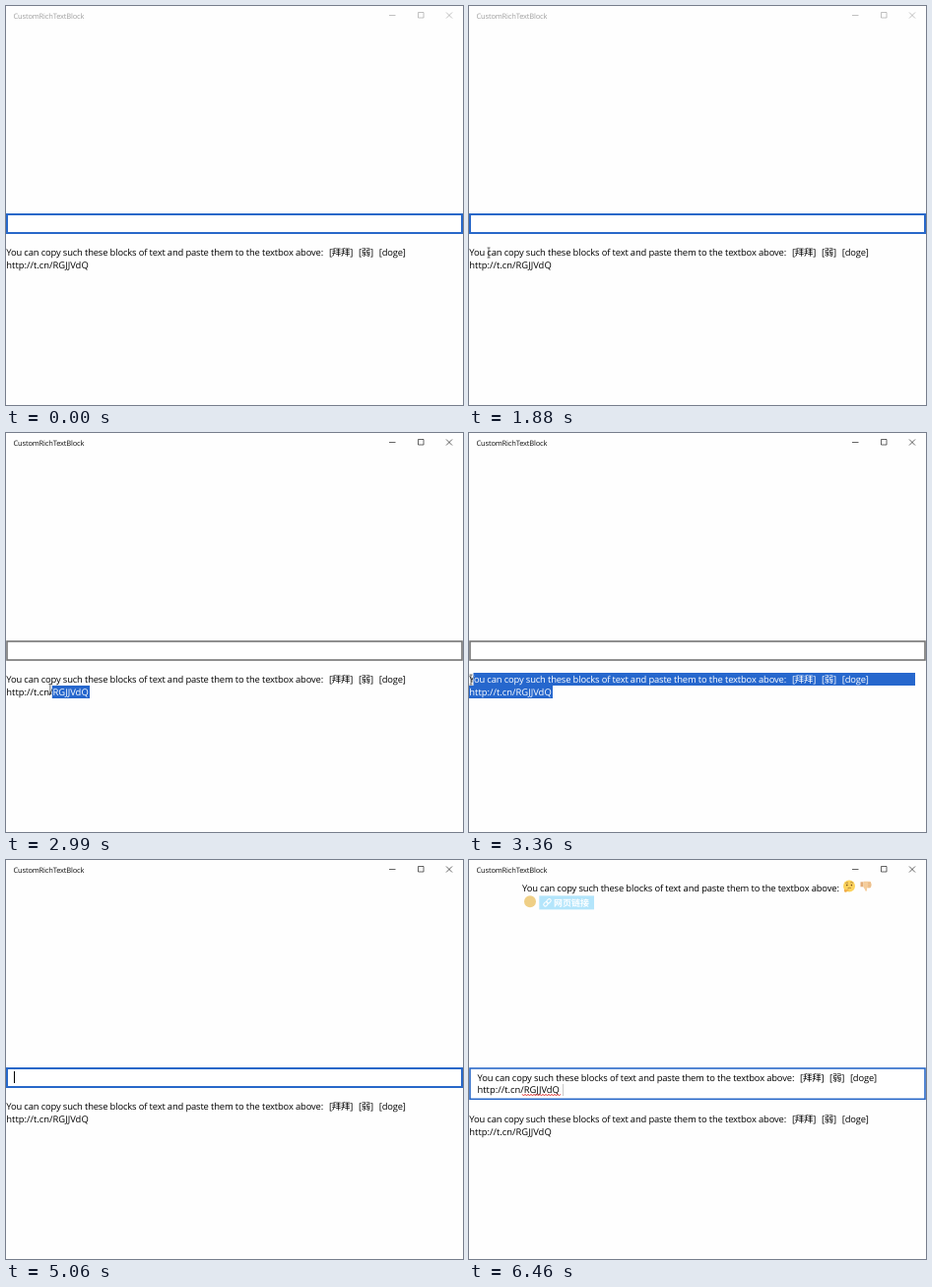
An HTML page for the animation above (6.48 s loop, 464 by 406 pixels).

```html
<!DOCTYPE html>
<html lang="en">
<head>
<meta charset="utf-8">
<title>CustomRichTextBlock</title>
<style>
  html, body { margin: 0; width: 100%; height: 100%; overflow: hidden; background: #fefefe; }
  svg { display: block; width: 100vw; height: 100vh; }
  text {
    font: 9.4px 'Open Sans', 'Noto Sans CJK SC', 'Noto Sans CJK', sans-serif;
    letter-spacing: -.142px;
    text-rendering: geometricPrecision;
  }
  .url { letter-spacing: .02px; }
  .title { font-size: 7.5px; letter-spacing: -.16px; }
  .link { font-size: 9px; font-weight: 700; letter-spacing: 0; fill: #fff; }
  .line { fill: none; }
</style>
</head>
<body>
<svg viewBox="0 0 464 406">
  <defs>
    <text id="lead">You can copy such these blocks of text and paste them to the textbox above:</text>
    <g id="message">
      <use href="#lead"/>
      <text x="327.6">[拜拜]</text>
      <text x="357.6">[弱]</text>
      <text x="378.4">[doge]</text>
      <text class="url" y="12.8">http://t.cn/RGJJVdQ</text>
    </g>
    <clipPath id="selection">
      <rect id="first" y="244" height="13"/>
      <rect id="second" y="257" height="13"/>
    </clipPath>
  </defs>

  <g id="chrome">
    <text class="title" x="7.5" y="12.6">CustomRichTextBlock</text>
    <path class="line" stroke="currentColor" stroke-width=".65" d="M389 9.5h6.5M418.5 6.5h5.5v5.5h-5.5zM447 6.5l6 6m0-6l-6 6"/>
  </g>

  <g id="output">
    <use href="#lead" x="54" y="32.2"/>
    <g transform="translate(386 26.6)">
      <circle r="6" fill="#fcd35c"/>
      <path d="M-3.6-3q1.4-1 2.6-.2M1.2-3.6q1.5-.8 2.7.4M-1.5 2.2q1.8-.9 3.4-.2" class="line" stroke="#8a5c28" stroke-width=".6"/>
      <circle cx="-2.2" cy="-1" r=".8" fill="#6b4520"/>
      <circle cx="2.4" cy="-1" r=".8" fill="#6b4520"/>
      <path d="M-5 2.8l1.5 1 3-.4q1 .6-.4 1.1l-1.2.4q0 1.5-2 1.3-1.4-.6-.9-3.4z" fill="#f0ab48"/>
    </g>
    <g transform="translate(403 26.8)">
      <path d="M-5.5-4.5h3v5h-3z" fill="#e3ad78"/>
      <path d="M-2.5-5h6.5q1.5.2 1.2 1.6 1 .8.3 1.9.6 1-.3 1.8.1 1.3-1.4 1.3H.9q.7 3.2-.8 3.4-1.1 0-1.1-1.7L-2.5 1z" fill="#f5cd9b"/>
      <path d="M2-3.2h3M2-1.4h3.2M2 .4h3" class="line" stroke="#dba56f" stroke-width=".6"/>
    </g>
    <circle cx="62" cy="42.3" r="6" fill="#efcf86"/>
    <rect x="71.3" y="36.4" width="55.7" height="14" fill="#b3e5fb"/>
    <g class="line" stroke="#fff" stroke-width="1" transform="translate(79.5 43.3) rotate(-45)">
      <rect x="-4.6" y="-1.7" width="5" height="3.4" rx="1.7"/>
      <rect x="-.4" y="-1.7" width="5" height="3.4" rx="1.7"/>
    </g>
    <text class="link" x="86" y="46.7">网页链接</text>
  </g>

  <rect id="box" x="1" y="212" width="462" fill="#fff"/>
  <g id="input">
    <use href="#message" x="8.5" y="224.6"/>
    <path id="squiggle" class="line" stroke="#e02f2f" stroke-width=".9"/>
  </g>
  <path id="caret" class="line" d="M0 0v12" stroke="#000"/>

  <g id="sample">
    <use href="#message" x=".3" y="254.1"/>
    <g clip-path="url(#selection)">
      <rect y="244" width="464" height="26" fill="#2667cd"/>
      <use href="#message" x=".3" y="254.1" fill="#fff"/>
    </g>
  </g>

  <path id="beam" class="line" d="M-1.5-5h3M0-5v10M-1.5 5h3" stroke="#333" stroke-width=".7"/>
  <path id="arrow" d="M0 0V8.6L2 6.9 3.5 10.1 4.9 9.5 3.5 6.4H6.1Z" fill="#fff" stroke="#555" stroke-width=".7"/>
</svg>
<script>
  const LOOP = 6480, ACTIVATE = 1900, FOCUS = 4750, PASTE = 5400, SETTLE = 5480;
  const $ = id => document.getElementById(id);
  const set = (id, attrs) => {
    for (const name in attrs) $(id).setAttribute(name, attrs[name]);
  };
  const show = (id, on) => set(id, { visibility: on ? 'visible' : 'hidden' });

  // Each stop is [time, ...values]; outside its span a track gives null.
  function along(stops, t) {
    const i = stops.findIndex(stop => stop[0] > t);
    if (i < 1) return null;
    const a = stops[i - 1], b = stops[i], k = (t - a[0]) / (b[0] - a[0]);
    return a.slice(1).map((v, n) => v + (b[n + 1] - v) * k);
  }

  const arrowTracks = [
    [[900, 413, 0], [1270, 97, 233], [1410, 64, 270], [1530, 23, 258], [1570, 23, 258]],
    [[3840, 0, 250], [4100, 18, 251], [4450, 43, 233], [FOCUS, 43, 233]]
  ];
  const beamTracks = [
    [[1570, 24, 251], [2040, 18, 251], [2220, 18, 251], [2400, 114, 251], [2450, 115, 251], [2780, 115, 251]],
    [[2780, 85, 264], [2960, 50, 262], [3080, 30, 256], [3360, 2, 251], [3570, 2, 251], [3630, -4, 251]],
    [[6180, 46, 225], [6280, 95, 231]]
  ];
  const caretTrack = [
    [4960, 0], [5060, 1], [PASTE, 1], [PASTE, 0], [5445, 0], [5510, 1],
    [5940, 1], [6030, 0], [6440, 0], [LOOP, .4]
  ];

  const locate = (tracks, t) => tracks.map(track => along(track, t)).find(Boolean);

  function place(id, point) {
    show(id, point);
    if (point) set(id, { transform: `translate(${point})` });
  }

  // Returns [start, end] for both text lines.
  function selected(t, point) {
    const none = [0, 0], all = [0, 85];
    if (t < 2220 || t >= FOCUS) return [none, none];
    const x = point ? 18 + 4.8 * Math.round((point[0] - 18) / 4.8) : 0;
    if (t < 2780) return [[18, x], none];
    if (t >= 3590) return [[0, 453], all];
    return point[1] > 257 ? [none, [x, 85]] : [[Math.max(4.5, x), 453], all];
  }

  function draw(now) {
    const t = now % LOOP;
    const pasted = t >= PASTE;
    const grow = !pasted ? 0 : t < SETTLE ? 11 : 13;
    const focused = t < ACTIVATE || t >= FOCUS;
    const beam = locate(beamTracks, t);
    const ink = t < ACTIVATE ? '#a0a0a0' : '#111';

    set('chrome', { fill: ink, color: ink });
    set('box', {
      height: pasted ? 18.3 + grow : 19,
      stroke: focused ? '#2868c9' : '#747474',
      'stroke-width': focused && !pasted ? 2 : 1.6
    });
    set('sample', { transform: `translate(0 ${grow})` });
    show('input', pasted);
    show('output', pasted);
    show('squiggle', t >= SETTLE);

    set('caret', {
      transform: pasted ? 'translate(95.5 228)' : 'translate(8.5 215)',
      opacity: (along(caretTrack, t) || [0])[0]
    });

    selected(t, beam).forEach(([from, to], i) =>
      set(i ? 'second' : 'first', { x: from, width: Math.max(0, to - from) }));
    place('arrow', locate(arrowTracks, t));
    place('beam', beam);
  }

  set('squiggle', { d: 'M54 238.2' + 'l1.5 1.8l1.5-1.8'.repeat(13) });
  const start = performance.now();
  const tick = () => {
    draw(performance.now() - start);
    requestAnimationFrame(tick);
  };
  tick();
</script>
</body>
</html>
```
